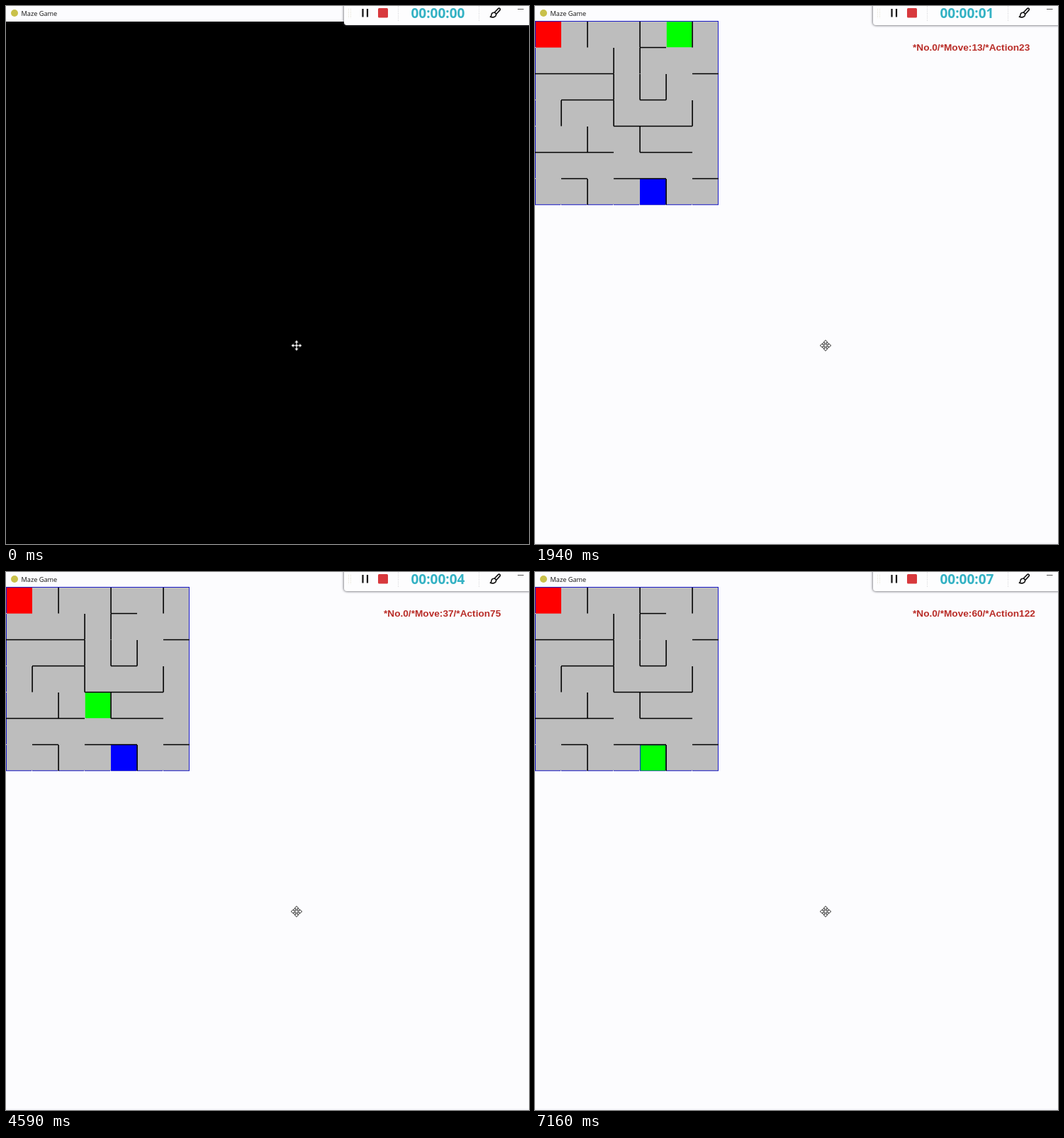
Recreate the animation shown at these times as an HTML page. Size 738 px wide and 759 px high, loop 8000 ms.

```html
<!DOCTYPE html>
<html lang="en">
<head>
<meta charset="utf-8">
<title>Maze Game</title>
<style>
  html, body { margin: 0; width: 100%; height: 100%; overflow: hidden; background: #000; }
  .stage { position: relative; width: 100%; height: 100%; overflow: hidden; contain: strict; }
  svg { display: block; position: absolute; left: 0; top: 0; }
  .bar { position: absolute; left: 477px; top: 0; width: 261px; height: 27px;
         background: #fdfdfe; border-radius: 0 0 0 4px; box-shadow: 0 0 3px 1px rgba(70, 70, 80, .65); }
  .title { font: 9.2px "Open Sans", sans-serif; fill: #111; }
  .clock { font: bold 19px "Open Sans", sans-serif; fill: #34b2c4; }
  .info { font: bold 13.65px "Liberation Sans", Arial, sans-serif; fill: #b92d28; }
</style>
</head>
<body>
<div class="stage">
<svg width="738" height="759" viewBox="0 0 738 759">
  <rect width="738" height="22" fill="#fcfcfe"/>
  <circle cx="12" cy="10" r="5" fill="#c9c14a"/>
  <text class="title" x="21.5" y="13.5">Maze Game</text>
  <g id="page">
    <rect y="21" width="738" height="738" fill="#fcfcfe"/>
    <rect y="757" width="738" height="2" fill="#f6f6f9"/>
    <g id="maze">
      <rect x=".5" y="21.5" width="258" height="258.8" fill="#bdbdbd" stroke="#1a1ac8"/>
      <rect x="1" y="22" width="36" height="36.6" fill="#f00"/>
      <rect x="148" y="244" width="37" height="36" fill="#00f"/>
      <rect id="player" width="35.6" height="35.9" fill="#0f0"/>
    </g>
    <text class="info" id="info" x="533" y="63"></text>
  </g>
  <path d="M410 471.3l3.2 3.7h-2.2v3h3v-2.2l3.7 3.2-3.7 3.2v-2.2h-3v3h2.2l-3.2 3.7-3.2-3.7h2.2v-3h-3v2.2l-3.7-3.2 3.7-3.2v2.2h3v-3h-2.2z"
        fill="#fff" stroke="#111" stroke-width=".9"/>
</svg>
<div class="bar"></div>
<svg width="738" height="30" viewBox="0 0 738 30">
  <g stroke="#d2d2d6" stroke-dasharray="1 1.5">
    <path d="M483.5 4V17M486.5 4V17" stroke="#e4e0d0"/>
    <path d="M553.5 0V22M667.5 0V22"/>
  </g>
  <path d="M503.5 4V15.5M510 4V15.5" stroke="#111" stroke-width="2.2"/>
  <rect x="525" y="3" width="14" height="13.5" rx="1.5" fill="#d8393d"/>
  <text class="clock" id="clock" x="571.5" y="17.3"></text>
  <g fill="none" stroke="#111" stroke-width="1.6" stroke-linejoin="round">
    <path d="M689.3 9L694.6 3.6a1.6 1.6 0 0 1 2.3 2.3L691.8 11.5"/>
    <path d="M689.3 9.3c-3-.4-4.3 1.4-4.3 3.2 0 1.5-.6 2.3-1.6 2.8 3 1.2 7.7.6 8.2-2.8 0-1.6-.8-2.8-2.3-3.2z"/>
  </g>
  <path d="M722 4.5h8.5" stroke="#555"/>
</svg>
</div>
<script>
const LOOP = 8000, PAGE_AT = 720, SIZE = 7, CELL = 37, TOP = 22;
const GOAL = { r: 6, c: 4 };
// columns having a wall on their right / lower side, row by row
const RIGHT = ["135", "23", "234", "025", "13", "", "14"];
const BELOW = ["4", "0126", "124", "345", "01245", "1346", ""];
// [action, start time]; actions between are evenly spaced
const PACE = [[1, 745], [23, 1930], [42, 2940], [75, 4580], [93, 5550], [122, 7155]];
const $ = id => document.getElementById(id);

function rect(x, y, w, h, fill) {
  const el = document.createElementNS("http://www.w3.org/2000/svg", "rect");
  Object.entries({ x, y, width: w, height: h, fill }).forEach(([k, v]) => el.setAttribute(k, v));
  $("maze").append(el);
}

function drawWalls() {
  for (let i = 1; i < SIZE; i++) {
    rect(i * CELL - 1, 280, 1, 1, "#dde");
    rect(0, TOP + i * CELL - 1, 1, 1, "#dde");
  }
  for (let r = 0; r < SIZE; r++) {
    const y = TOP + r * CELL;
    for (const c of RIGHT[r]) rect((+c + 1) * CELL - .7, y, 1.6, CELL - .5, "#000");
    for (const c of BELOW[r]) rect(c * CELL, y + CELL - 1.2, CELL, 1.5, "#000");
  }
}

function blocked(r, c, dr, dc) {
  const nr = r + dr, nc = c + dc;
  if (nr < 0 || nc < 0 || nr >= SIZE || nc >= SIZE) return true;
  return dc ? RIGHT[r].includes(Math.min(c, nc)) : BELOW[Math.min(r, nr)].includes(c);
}

// Depth-first search; every bump into a wall, step and step back is one action.
function solve() {
  const dirs = [[-1, 0], [0, 1], [1, 0], [0, -1]];
  const seen = new Set(), log = [{ r: 0, c: 0, move: 0 }];
  let move = 0;
  const add = (r, c) => log.push({ r, c, move });
  function visit(r, c) {
    if (r === GOAL.r && c === GOAL.c) return true;
    seen.add(r + "," + c);
    for (const [dr, dc] of dirs) {
      const nr = r + dr, nc = c + dc;
      if (blocked(r, c, dr, dc)) { add(r, c); continue; }
      if (seen.has(nr + "," + nc)) continue;
      move++;
      add(nr, nc);
      if (visit(nr, nc)) return true;
      move++;
      add(r, c);
    }
    return false;
  }
  visit(0, 0);
  return log;
}

function actionAt(t) {
  if (t < PACE[0][1]) return 0;
  for (let i = 1; i < PACE.length; i++) {
    const [a0, t0] = PACE[i - 1], [a1, t1] = PACE[i];
    if (t < t1) return Math.floor(a0 + (a1 - a0) * (t - t0) / (t1 - t0));
  }
  return PACE[PACE.length - 1][0];
}

function render(t) {
  const action = actionAt(t), s = log[action];
  $("page").style.display = t < PAGE_AT ? "none" : "";
  $("player").setAttribute("x", s.c * CELL + .8);
  $("player").setAttribute("y", TOP + s.r * CELL + .3);
  $("info").textContent = `*No.0/*Move:${s.move}/*Action${action}`;
  $("clock").textContent = "00:00:0" + Math.max(0, Math.floor((t - 120) / 1000));
}

drawWalls();
const log = solve();
const start = performance.now();
function tick() {
  render((performance.now() - start) % LOOP);
  requestAnimationFrame(tick);
}
tick();
</script>
</body>
</html>
```
